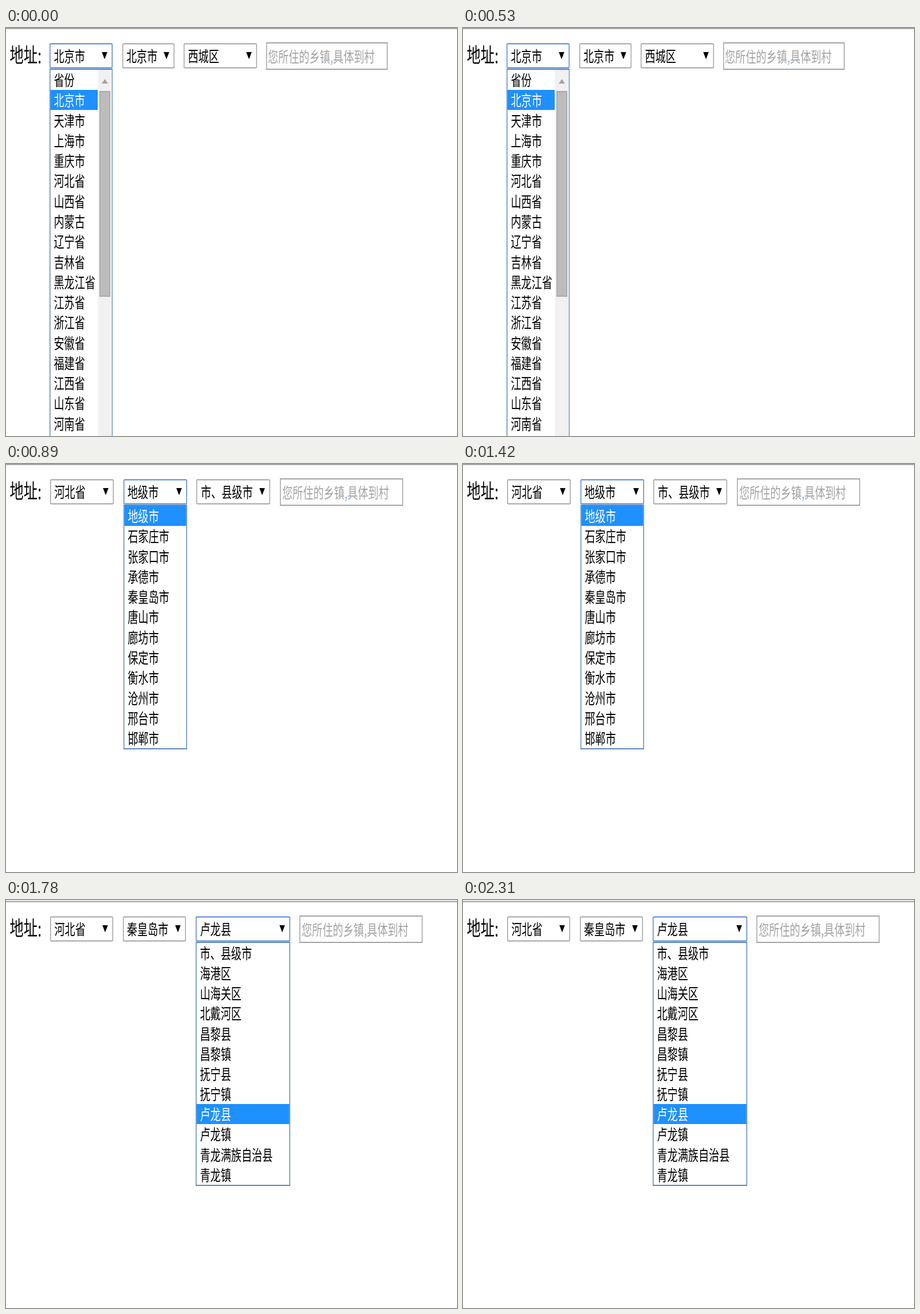
Animation of 787 by 712 pixels, one loop 2670 ms. Source, as an HTML page with a canvas:

```html
<!DOCTYPE html>
<html lang="zh-CN">
<head>
<meta charset="utf-8">
<style>
html, body { margin: 0; width: 100%; height: 100%; overflow: hidden; background: #fff; }
canvas { display: block; }
</style>
</head>
<body>
<canvas id="stage" width="787" height="712"></canvas>
<script>
const ctx = document.getElementById("stage").getContext("2d");
const STEP_MS = 890, SCALE_X = 1.51, SCALE_Y = 2.205;
const GREY = "#a3a3a3", BLUE = "#1e90ff", FOCUS = "#5585d2", LIST_EDGE = "#5f8ab8";

// Each select is [left, right, textX, arrowX, label].
const steps = [
  {
    shift: 0, focus: 0, comma: "#78b4ec",
    selects: [[76, 186, 83.5, 172, "北京市"], [203, 294, 210, 280, "北京市"], [310, 438, 317.5, 424, "西城区"]],
    input: [454, 666, 457],
    list: {
      left: 76, right: 186, top: 73, rowHeight: 35.28, picked: 1, scroll: true,
      items: "省份 北京市 天津市 上海市 重庆市 河北省 山西省 内蒙古 辽宁省 吉林省 黑龙江省 江苏省 浙江省 安徽省 福建省 江西省 山东省 河南省"
    }
  },
  {
    shift: 0, focus: 1, comma: "#78b4ec",
    selects: [[77, 188, 84.5, 174, "河北省"], [205, 316, 212, 302, "地级市"], [332, 461, 340, 447, "市、县级市"]],
    input: [478, 693, 482],
    list: {
      left: 205, right: 316, top: 73, rowHeight: 35.28, picked: 0,
      items: "地级市 石家庄市 张家口市 承德市 秦皇岛市 唐山市 廊坊市 保定市 衡水市 沧州市 邢台市 邯郸市"
    }
  },
  {
    shift: 2, focus: 2, comma: GREY,
    selects: [[77, 187, 84.5, 173, "河北省"], [204, 314, 211, 300, "秦皇岛市"], [331, 496, 338.5, 482, "卢龙县"]],
    input: [512, 727, 516],
    list: {
      left: 331, right: 496, top: 75, rowHeight: 35.15, picked: 8,
      items: "市、县级市 海港区 山海关区 北戴河区 昌黎县 昌黎镇 抚宁县 抚宁镇 卢龙县 卢龙镇 青龙满族自治县 青龙镇"
    }
  }
];

function rect(x, y, w, h, color) {
  ctx.fillStyle = color;
  ctx.fillRect(x, y, w, h);
}

// A white box whose border is one pixel at the stage's uneven scale.
function box(left, top, right, bottom, color, radius = 0) {
  ctx.beginPath();
  ctx.roundRect(left, top, right - left, bottom - top, radius);
  ctx.fillStyle = color;
  ctx.fill();
  rect(left + 1.5, top + 2, right - left - 3, bottom - top - 4, "#fff");
}

function triangle(x, base, tip, half, color) {
  ctx.beginPath();
  ctx.moveTo(x - half, base);
  ctx.lineTo(x + half, base);
  ctx.lineTo(x, tip);
  ctx.fillStyle = color;
  ctx.fill();
}

// Draws text vertically centred on y and returns the x where it ends.
function text(value, x, y, color = "#000", size = 12) {
  ctx.save();
  ctx.translate(x, y);
  ctx.scale(SCALE_X, SCALE_Y);
  ctx.font = `${size}px "Noto Sans CJK SC", "Noto Sans CJK", sans-serif`;
  ctx.fillStyle = color;
  ctx.fillText(value, 0, size * 0.38);
  const end = x + ctx.measureText(value).width * SCALE_X;
  ctx.restore();
  return end;
}

function drawSelect([left, right, textX, arrowX, label], shift, focused) {
  box(left, 26.5 + shift, right, 70.5 + shift, focused ? FOCUS : GREY, 2.5);
  text(label, textX, 49 + shift);
  triangle(arrowX, 42 + shift, 54.5 + shift, 4.8, "#000");
}

function drawList({ left, right, top, rowHeight, picked, scroll, items }) {
  const rows = items.split(" ");
  const bottom = Math.round(top + rows.length * rowHeight) + 2;
  box(left, top - 2, right, scroll ? 720 : bottom, LIST_EDGE);
  const rowRight = scroll ? 160 : right - 1.5;
  rows.forEach((name, i) => {
    const y = Math.round(top + i * rowHeight);
    if (i === picked) rect(left + 1.5, y, rowRight - left - 1.5, 35, BLUE);
    text(name, left + 7.5, y + 17.5, i === picked ? "#fff" : "#000");
  });
  if (scroll) {
    rect(160.5, 73, 24, 640, "#f1f1f1");
    triangle(172.5, 97, 89, 5.5, GREY);
    rect(163, 110, 19, 359, "#a8a8a8");
    rect(164.5, 112, 16, 355, "#bcbcbc");
  }
}

function draw(now) {
  const { shift, focus, comma, selects, input, list } = steps[Math.floor(now / STEP_MS) % steps.length];
  rect(0, 0, 787, 712, "#fff");
  rect(0, 0, 787, shift, "#ebebeb");
  rect(0, shift, 787, 2, "#a8a8a8");
  const labelEnd = text("地址", 6.5, 46.8 + shift, "#000", 16);
  text(":", labelEnd + 0.5, 49 + shift, "#000", 16);
  selects.forEach((select, i) => drawSelect(select, shift, i === focus));

  const [left, right, textX] = input, y = 49.5 + shift;
  box(left, 25 + shift, right, 73 + shift, GREY);
  let x = text("您所住的乡镇", textX, y, GREY);
  x = text(",", x, y, comma);
  text("具体到村", x, y, GREY);

  drawList(list);
}

const start = performance.now();
function tick() {
  draw(performance.now() - start);
  requestAnimationFrame(tick);
}
tick();
</script>
</body>
</html>
```
